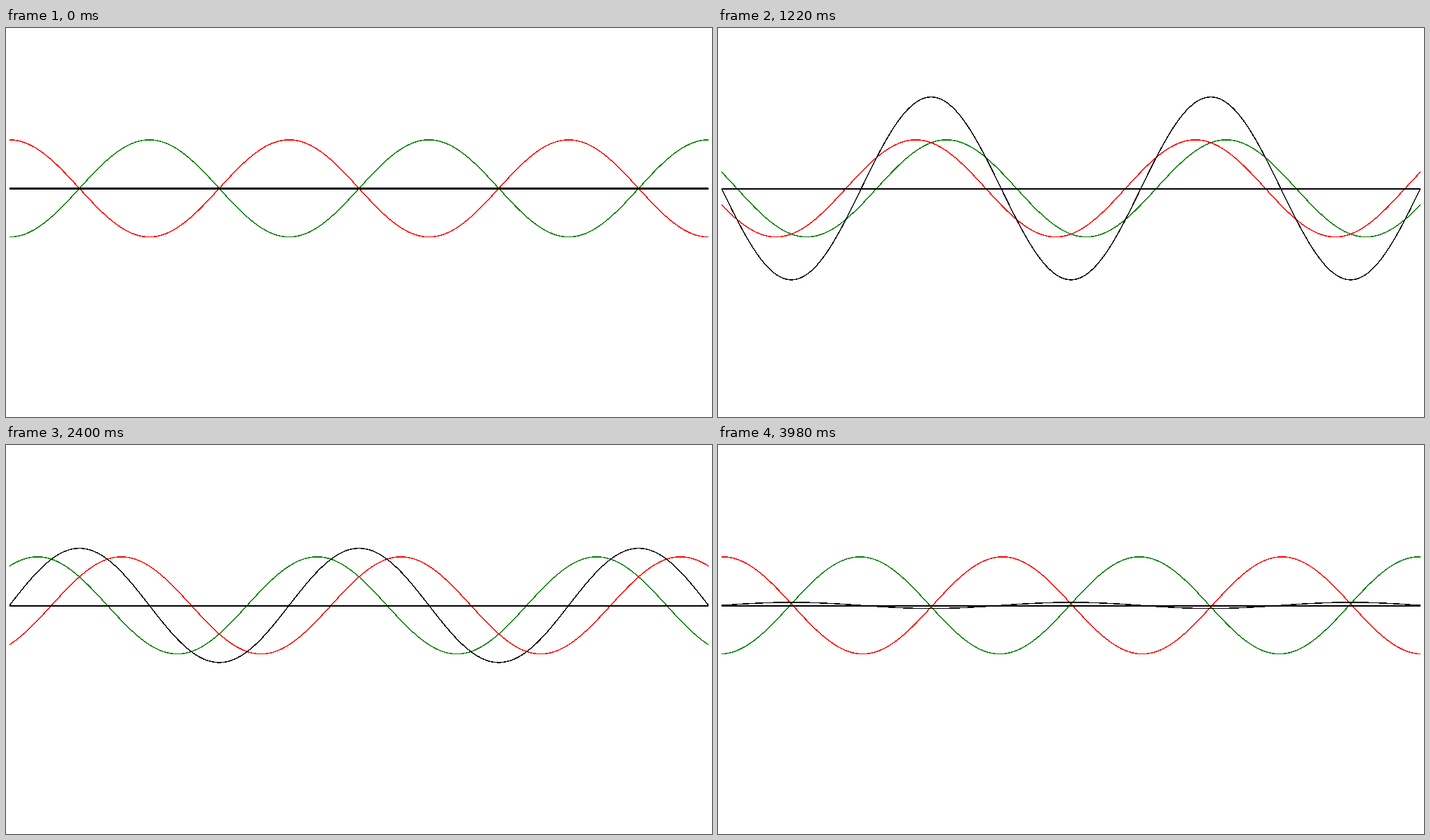
A matplotlib script that plays this animation: 1007x556 px, repeating every 4000 ms.

```python
import numpy as np
import matplotlib.pyplot as plt
from matplotlib.animation import FuncAnimation

W, H, DPI = 1007, 556, 64
FRAMES, INTERVAL = 200, 20
LEFT, RIGHT = 5, 1002
TOP, BOTTOM = 80, 380
MID, AMP, PEN = 229.25, 69.4, 1.5
AXIS_TOP, AXIS_BOTTOM = 229, 231
WAVE = 2 * np.pi * 2.5 / (RIGHT - LEFT)
GREEN, RED, BLACK = (0, 128, 0), (255, 0, 0), (0, 0, 0)

fig = plt.figure(figsize=(W / DPI, H / DPI), dpi=DPI, facecolor="white")
ax = fig.add_axes([0, 0, 1, 1])
ax.axis("off")

# Pixel centres of the band that holds the waves
phase = WAVE * (np.arange(LEFT, RIGHT) + 0.5 - LEFT)
rows = np.arange(TOP, BOTTOM)[:, None] + 0.5

canvas = np.full((BOTTOM - TOP, RIGHT - LEFT, 3), 255, np.uint8)
picture = ax.imshow(canvas, extent=(LEFT, RIGHT, BOTTOM, TOP),
                    aspect="auto", interpolation="nearest")
ax.set_xlim(0, W)
ax.set_ylim(H, 0)


def stroke(height, slope, color):
    """Paint a hard-edged curve of even thickness."""
    reach = PEN / 2 * np.sqrt(1 + slope ** 2)
    canvas[np.abs(rows - (MID - height)) <= reach] = color


def update(frame):
    shift = 2 * np.pi * frame / FRAMES
    a, b = phase - shift, phase + shift
    right_going, right_slope = -AMP * np.cos(a), AMP * WAVE * np.sin(a)
    left_going, left_slope = AMP * np.cos(b), -AMP * WAVE * np.sin(b)

    canvas[:] = 255
    stroke(right_going, right_slope, GREEN)
    stroke(left_going, left_slope, RED)
    stroke(right_going + left_going, right_slope + left_slope, BLACK)
    canvas[AXIS_TOP - TOP:AXIS_BOTTOM - TOP] = BLACK
    picture.set_data(canvas)
    return picture,


def init():
    return update(0)


anim = FuncAnimation(fig, update, frames=FRAMES, init_func=init,
                     interval=INTERVAL, repeat=True, repeat_delay=0, blit=False)
plt.show()
```
